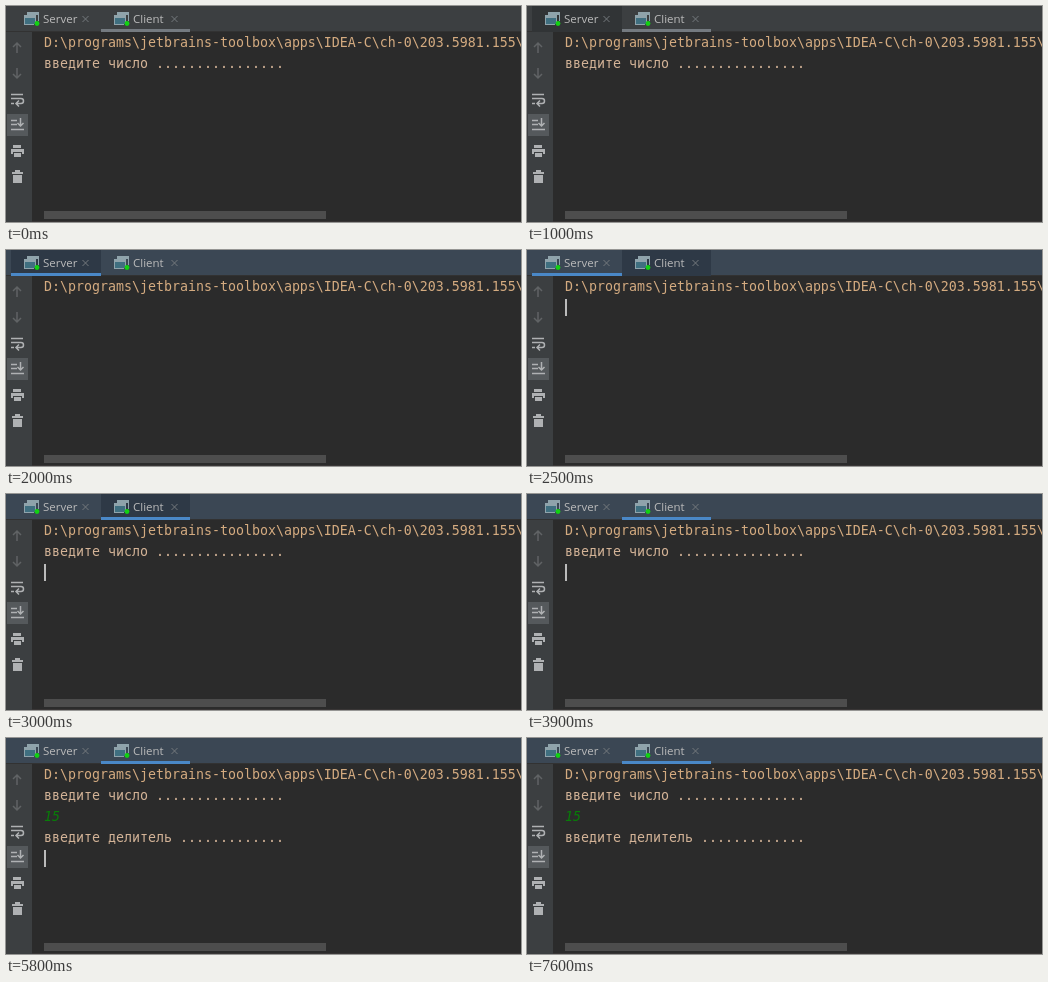
An HTML page with a canvas for the animation above (8 s loop, 515x216 px).

```html
<!DOCTYPE html>
<html lang="ru">
<head>
<meta charset="utf-8">
<style>
  html, body { margin: 0; width: 100%; height: 100%; overflow: hidden; background: #2b2b2b; }
  canvas { display: block; }
</style>
</head>
<body>
<canvas id="stage" width="515" height="216"></canvas>
<script>
const ctx = document.getElementById('stage').getContext('2d');
const LOOP = 8000;
const CELL = 8, LINE = 21, LEFT = 38, FIRST_BASELINE = 41;
const MONO = '13.29px "DejaVu Sans Mono", monospace';
const ICON = '#afb1b3', DISABLED = '#606365';
const TABS = [
  { name: 'Server', x: 5, width: 90, hover: [1000, 2100] },
  { name: 'Client', x: 95, width: 89, hover: [2500, 3300] }
];
const CARET_ON = [[1400, 2000], [2400, 2900], [3000, 3400], [3900, 4300], [4800, 6700], [7100, 7600]];

const within = (t, [from, to]) => t >= from && t < to;

function box(color, x, y, w, h) {
  ctx.fillStyle = color;
  ctx.fillRect(x, y, w, h);
}

function text(str, x, y, color, font) {
  ctx.font = font;
  ctx.fillStyle = color;
  ctx.fillText(str, x, y);
}

function stroke(path, color, width = 1.5) {
  ctx.strokeStyle = color;
  ctx.lineWidth = width;
  ctx.stroke(new Path2D(path));
}

function consoleLine(str, row, color, style = '') {
  text(str, LEFT, FIRST_BASELINE + row * LINE, color, style + MONO);
}

function windowIcon(x) {
  const color = '#8fa3ab';
  box(color, x + 3, 6, 12, 3);
  box(color, x + 14, 9, 1, 6);
  box(color, x, 9, 12, 3);
  box(color, x, 12, 1, 7);
  box(color, x + 11, 12, 1, 4);
  box(color, x, 18, 10, 1);
  box('#3f6f80', x + 1, 12, 10, 6);
  ctx.fillStyle = '#12d112';
  ctx.beginPath();
  ctx.arc(x + 13, 17.5, 2.4, 0, 2 * Math.PI);
  ctx.fill();
}

function drawTab(tab, t, active, selected) {
  const { x, width } = tab;
  if (within(t, tab.hover)) box(active ? '#2e3946' : '#313436', x, 0, width, 26);
  if (selected) box(active ? '#4a88c7' : '#747a80', x, 23, width, 3);
  windowIcon(x + 13);
  text(tab.name, x + 32, 17, '#bbbbbb', '11.5px "Open Sans", sans-serif');
  const right = x + width - 18.5;
  stroke(`M${right} 10l6 6m0-6l-6 6`, '#74797d', 1);
}

function drawToolbar() {
  box('#3c3f41', 0, 26, 26, 190);
  stroke('M11 47V37M7 41l4-4 4 4', DISABLED);
  stroke('M11 62v10M7 68l4 4 4-4', DISABLED);

  stroke('M5 88.5h12M5 92.5h10a2.5 2.5 0 0 1 0 5h-4M5 97.5h3M13 94.5l-3 3 3 3', ICON);

  box('#55595c', 1, 108, 21, 22);
  stroke('M5 114.5h6M5 118.5h6M5 123.5h13M14.5 112v8M11.5 117l3 3 3-3', ICON);

  box(ICON, 7, 139, 8, 3);
  box(ICON, 5, 143, 13, 5);
  box('#3c3f41', 7, 146, 9, 2);
  box(ICON, 8, 147, 7, 4);

  box(ICON, 6, 166, 11, 2);
  box(ICON, 9, 164, 5, 2);
  box(ICON, 7, 169, 9, 8);
}

function drawConsole(t, server) {
  box('#2b2b2b', 26, 26, 489, 190);
  consoleLine('D:\\programs\\jetbrains-toolbox\\apps\\IDEA-C\\ch-0\\203.5981.155\\', 0, '#d4ab80');
  let row = 1, column = 0;
  if (!server) {
    const typed = '15'.slice(0, t >= 5100 ? 2 : t >= 5000 ? 1 : 0);
    consoleLine('введите число ' + '.'.repeat(16), 1, '#d3b397');
    consoleLine(typed, 2, '#087d08', 'italic ');
    row = 2;
    column = typed.length;
    if (t >= 5800) {
      consoleLine('введите делитель ' + '.'.repeat(13), 3, '#d3b397');
      row = 4;
      column = 0;
    }
  }
  if (CARET_ON.some(span => within(t, span))) {
    const x = Math.max(LEFT, LEFT + column * CELL - 1);
    box('#bbbbbb', x, 28 + row * LINE, 2, 17);
  }
  box('#4d4d4d', 38, 205, 282, 8);
  box('#393636', 0, 215, 515, 1);
}

function draw(t) {
  const active = t >= 1300;
  const server = within(t, [1500, 3000]);
  drawConsole(t, server);
  drawToolbar();
  box(active ? '#3b4754' : '#3c3f41', 0, 0, 515, 26);
  box('#323232', 0, 25, 515, 1);
  TABS.forEach((tab, i) => drawTab(tab, t, active, server === (i === 0)));
}

const start = performance.now();
function frame() {
  draw((performance.now() - start) % LOOP);
  requestAnimationFrame(frame);
}
frame();
</script>
</body>
</html>
```
